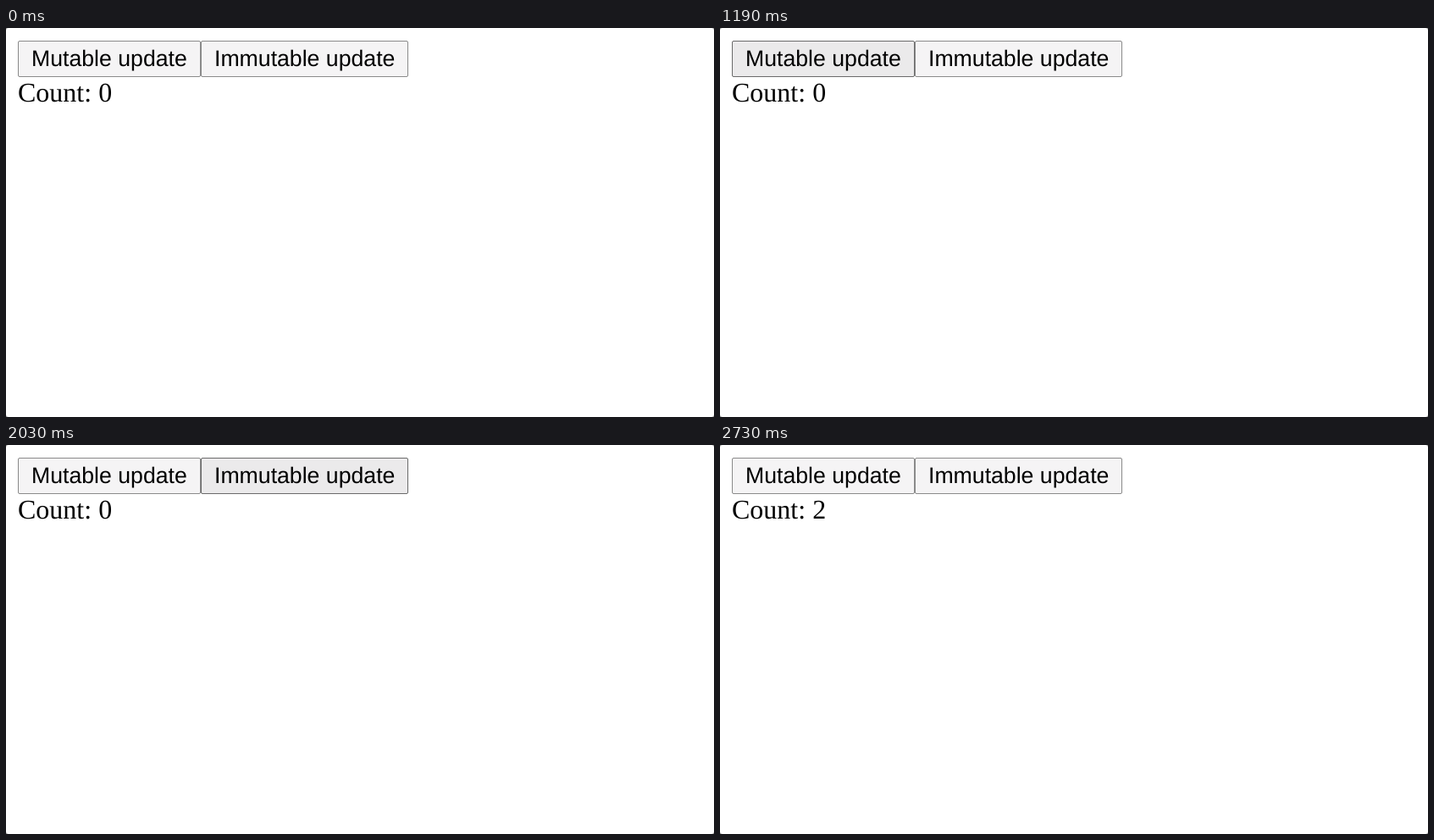
Animation of 836x460 px, one loop 2.87 s. Source, as an HTML page:

```html
<!DOCTYPE html>
<html lang="en">
<head>
<meta charset="utf-8">
<title>Counter</title>
<style>
  html, body { margin: 0; width: 100%; height: 100%; overflow: hidden; background: #fff; }
  svg { display: block; width: 836px; height: 460px; }
  text { fill: #000; text-rendering: geometricPrecision; white-space: pre; }
  .label { font: 26.667px "Liberation Sans", Arial, sans-serif; }
  .count { font: 32px "Liberation Serif", "Times New Roman", serif; }
</style>
</head>
<body>
<svg viewBox="0 0 836 460">
  <rect width="836" height="460" fill="#858585"/>
  <rect width="836" height="460" rx="3" fill="#fff"/>
  <rect id="mutable" x="14.5" y="15.5" width="215" height="42" rx="1.5"/>
  <rect id="immutable" x="230.5" y="15.5" width="244" height="42" rx="1.5"/>
  <text class="label" x="30" y="45">Mutable update</text>
  <text class="label" x="246" y="45">Immutable update</text>
  <text class="count" id="count" x="14" y="87">Count: 0</text>
</svg>
<script>
  const LOOP = 2870;
  const looks = {
    idle: ['#f5f4f5', '#8a8a8a'],
    hover: ['#ebeaeb', '#6a6a6a'],
    active: ['#ffffff', '#9c9c9c']
  };

  // Each track lists [start time, value] in order.
  const tracks = {
    mutable: [[0, 'idle'], [1190, 'hover'], [1540, 'active'], [1610, 'hover'], [2030, 'idle']],
    immutable: [[0, 'idle'], [2030, 'hover'], [2170, 'active'], [2310, 'hover'], [2590, 'idle']],
    count: [[0, 0], [2310, 2]]
  };

  const byId = id => document.getElementById(id);
  const valueAt = (track, t) => track.filter(([start]) => start <= t).pop()[1];

  function paintButton(id, t) {
    const [fill, stroke] = looks[valueAt(tracks[id], t)];
    byId(id).setAttribute('fill', fill);
    byId(id).setAttribute('stroke', stroke);
  }

  function render(t) {
    paintButton('mutable', t);
    paintButton('immutable', t);
    byId('count').textContent = 'Count: ' + valueAt(tracks.count, t);
  }

  let begin;
  function tick(now) {
    begin ??= now;
    render(Math.max(0, now - begin) % LOOP);
    requestAnimationFrame(tick);
  }

  render(0);
  requestAnimationFrame(tick);
</script>
</body>
</html>
```
